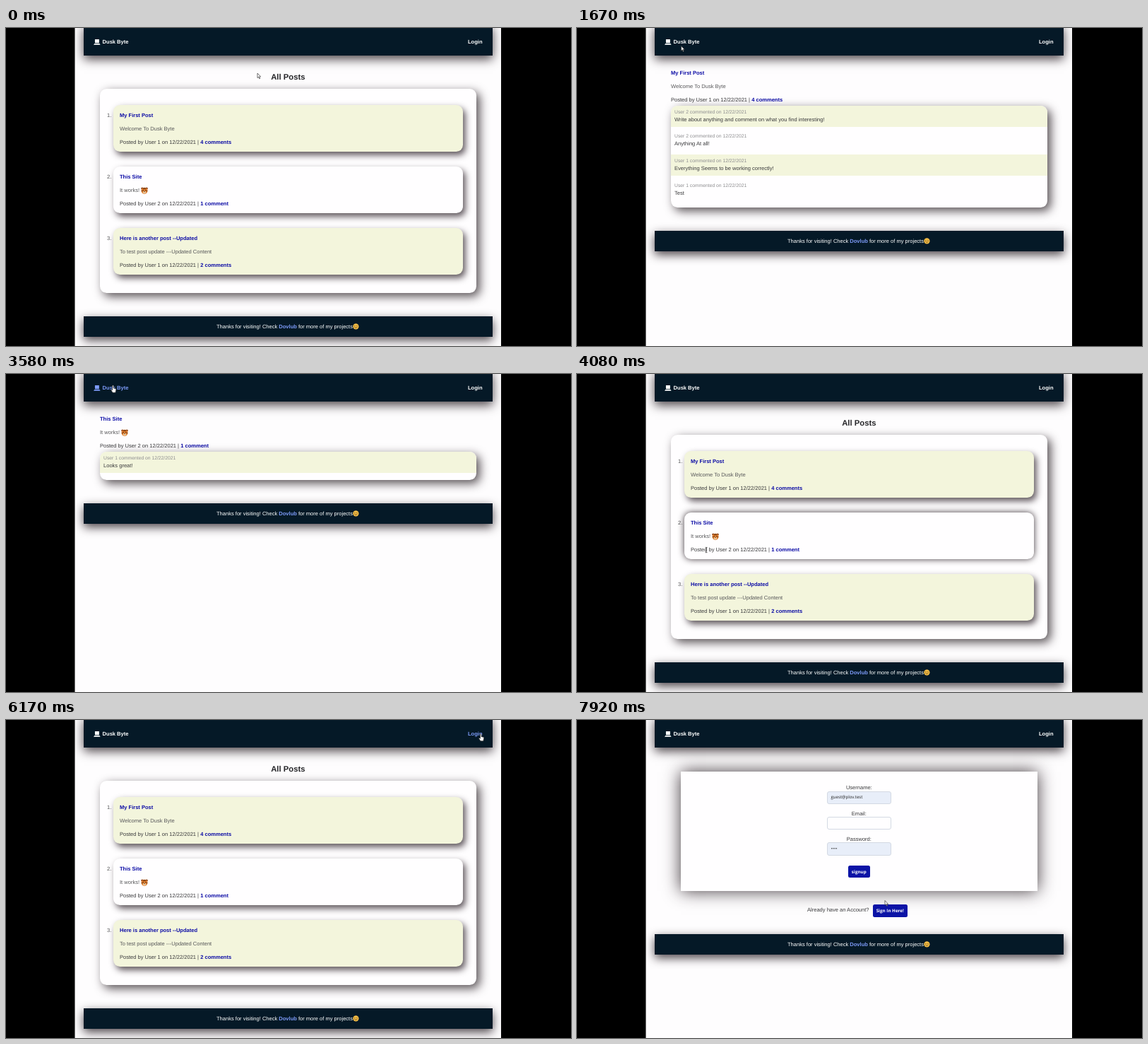
An HTML page for the animation above (8000 ms loop, 800x450 px).

```html
<!DOCTYPE html>
<html lang="en">
<head>
<meta charset="utf-8">
<title>Blog tour</title>
<style>
html, body { margin: 0; width: 100%; height: 100%; overflow: hidden; background: #000; }
#stage { position: absolute; inset: 0 auto auto 0; width: 800px; height: 450px; overflow: hidden;
  clip-path: inset(0 99px 0 97.5px); background: #fefdfe; color: #3a3a3c; cursor: none;
  font: 7.54px/10px "Liberation Sans", Arial, sans-serif; text-rendering: geometricPrecision; }
#stage div, #stage .t, #stage svg { position: absolute; box-sizing: border-box; }
#stage .page { position: static; display: none; }
#stage .page.show { display: block; }
.t { white-space: pre; }
.mid { transform: translateX(-50%); }
a { color: #0d0da6; font-weight: bold; }
a.on { color: #718af0; }
h1 { margin: 0; font-size: 11.3px; color: #27272a; }
.bar { background: #051927; box-shadow: 0 4.7px 14px rgba(30, 20, 26, .8); }
.bar ~ .t, .bar ~ .t a { color: #fff; }
.bar ~ .t a.on, .bar ~ .t .more { color: #7d9bf8; }
.panel { background: #fffeff; border-radius: 9.4px; box-shadow: 4.7px 4.7px 14px rgba(30, 20, 26, .75); }
.card { background: #fffeff; border-radius: 9.4px; box-shadow: 3.5px 4.7px 9.4px rgba(30, 20, 26, .72); }
.beige { background: #f3f5dc; }
.first { border-radius: 9.4px 9.4px 0 0; }
.item.on .card { box-shadow: 0 0 9.4px rgba(30, 20, 26, .85); }
.soft { color: #58585a; }
.note { font-size: 6.78px; color: #8d8d8f; }
.form { background: #fffeff; box-shadow: 0 0 23px rgba(30, 20, 26, .85); }
.field { border: 1px solid #d3d9e3; border-radius: 3px; background: #fffeff; }
.filled { background: #e8eef9; }
.small { font-family: "Open Sans", "Noto Sans", sans-serif; font-size: 6.1px; color: #222; }
#stage .btn { position: absolute; background: #0b13a6; color: #fff; border-radius: 2.5px; text-align: center;
  font: bold 6.28px/17px "Open Sans", "Noto Sans", sans-serif; }
#cursor { left: 0; top: 0; width: 14px; height: 16px; overflow: visible; pointer-events: none;
  fill: #fff; stroke: #333; stroke-width: .7; stroke-linejoin: round; }
</style>
</head>
<body>
<div id="stage"></div>
<script>
const SITE = 'Dusk Byte', DAY = '12/22/2021';

const box = (x, y, w, h, cls, tag = 'div', inner = '') =>
  `<${tag} class="${cls}" style="left:${x}px;top:${y}px;width:${w}px;height:${h}px">${inner}</${tag}>`;
const text = (x, y, s, cls = '', tag = 'span') =>
  `<${tag} class="t ${cls}" style="left:${x}px;top:${y - 5}px">${s}</${tag}>`;
const icon = (x, y, size, inner) =>
  `<svg style="left:${x}px;top:${y}px" width="${size}" height="${size}" viewBox="0 0 10 10">${inner}</svg>`;
const link = s => `<a>${s}</a>`;

const smile = `<circle cx="5" cy="5" r="4.7" fill="#f4bd45"/>
  <path d="M2.5 4.2q.8-1.1 1.6 0M5.9 4.2q.8-1.1 1.6 0M2.6 5.9q2.4 3 4.8 0" fill="none" stroke="#5a3a12" stroke-width=".9"/>`;
const tiger = `<circle cx="1.8" cy="2" r="1.6" fill="#8a3f16"/><circle cx="8.2" cy="2" r="1.6" fill="#8a3f16"/>
  <circle cx="5" cy="5.2" r="4.5" fill="#dd7a2b"/><ellipse cx="5" cy="7.4" rx="2.2" ry="1.6" fill="#f2d3a8"/>
  <path d="M5 1v2M3.3 1.5l.5 1.3M6.7 1.5l-.5 1.3M1 5.5h1.3M9 5.5H7.7M3 4.6h1M6 4.6h1M4.3 6.7h1.4" stroke="#40200f" stroke-width="1"/>`;
const thumb = `<path d="M.6 5h2l2-2.3.5-2.2q1.7 0 1.4 2L6.2 4h2.5q1 .6.4 1.5.5.8-.2 1.4.2.9-.5 1.3 0 1-.9 1H3.4L.6 8.8z"
  fill="#f0b93c" stroke="#4a3517" stroke-width=".8"/>`;
const laptop = `<path d="M2 1h6.2v5.6H2zM1.3 7.2h7.5L10 9H0z" fill="currentColor"/>`;

const posts = [
  { title: 'My First Post', body: 'Welcome To ' + SITE, user: 1, notes: [
    [2, 'Write about anything and comment on what you find interesting!'], [2, 'Anything At all!'],
    [1, 'Everything Seems to be working correctly!'], [1, 'Test']] },
  { title: 'This Site', body: 'It works!', tiger: true, user: 2, notes: [[1, 'Looks great!']] },
  { title: 'Here is another post --Updated', body: 'To test post update ---Updated Content', user: 1,
    notes: [[2, 'Perfect'], [1, '', thumb]] }
];

const footer = y => `<section>${box(110, y, 579, 29, 'bar')}` +
  text(298, y + 14.5, 'Thanks for visiting! Check <a class="more">Dovlub</a> for more of my projects') +
  icon(491.3, y + 10.3, 8.8, smile) + '</section>';

function summary(p, x, y) {
  const n = p.notes.length;
  return text(x, y, link(p.title)) + text(x, y + 19, p.body, 'soft') +
    (p.tiger ? icon(x + 30, y + 14, 10, tiger) : '') +
    text(x, y + 38, `Posted by User ${p.user} on ${DAY} | ` + link(n + (n > 1 ? ' comments' : ' comment')));
}

const home = text(399.3, 69.8, 'All Posts', 'mid', 'h1') + box(133, 86, 533, 289, 'panel') +
  posts.map((p, i) => {
    const y = 109.3 + 87 * i;
    return text(143, y + 15, i + 1 + '.', 'soft') + '<section class="item">' +
      box(152, y, 495, 66, i % 2 ? 'card' : 'card beige') + summary(p, 161, y + 15) + '</section>';
  }).join('') + footer(408);

function postPage(p) {
  const end = 115.3 + 34.7 * p.notes.length;
  return summary(p, 133, 64) + box(133, 110, 533, end - 110, 'panel') +
    p.notes.map(([user, words, pic], i) => {
      const y = 110 + 34.7 * i;
      return (i % 2 ? '' : box(133, y, 533, 30, i ? 'beige' : 'beige first')) +
        text(138, y + 9.5, `User ${user} commented on ${DAY}`, 'note') +
        text(138, y + 19.6, words) + (pic ? icon(138, y + 17.5, 9, pic) : '');
    }).join('') + footer(end + 33);
}

function formPage(fields, action, x, question, bx, button) {
  const end = 132.5 + 36.5 * fields.length;
  return box(147, 73, 505, end - 73, 'form') +
    fields.map(([name, value], i) => {
      const y = 96.3 + 36.4 * i;
      return text(399.3, y, name + ':', 'mid') + box(354, y + 4.2, 91, 18.3, value ? 'field filled' : 'field') +
        text(359.5, y + 13, value, 'small');
    }).join('') +
    box(384, end - 36, 30.5, 17, 'btn', 'a', action) + text(x, end + 27.3, question) +
    box(bx, end + 19, 49.5, 17.5, 'btn', 'a', button) + footer(end + 61);
}

const name = ['Username', 'guest@plov.test'], pass = ['Password', '••••'];
const pages = [home, ...posts.map(postPage),
  formPage([name, pass], 'login', 338, 'Need an Account?', 406, 'Sign Up Here!'),
  formPage([name, ['Email', ''], pass], 'signup', 326, 'Already have an Account?', 418.5, 'Sign In Here!')];

const stage = document.getElementById('stage');
stage.innerHTML = `<section>${box(110, -5, 579, 44, 'bar')}` +
  text(136.6, 20, `<a>${icon(-12.6, .2, 9.6, laptop)}${SITE}</a>`) + text(654, 20, link('Login')) + '</section>' +
  pages.map(p => `<div class="page">${p}</div>`).join('') + '<svg id="cursor"><path/></svg>';

const shapes = {
  arrow: 'M0 0V6.6L1.6 5.2 2.7 7.8 3.7 7.4 2.6 4.9H4.6Z',
  hand: 'M-.8.5Q0-.7.8.5V4L3.8 4.8Q4.6 5 4.4 6.2L3.6 10.3H-.4L-2.6 6.8Q-2.6 5.6-1.6 6L-.8 6.8Z',
  beam: 'M-1.5-3.6H1.5M0-3.6V3.6M-1.5 3.6H1.5'
};

// [start ms, page index]
const visits = [[0, 0], [1000, 1], [2080, 0], [2830, 2], [3670, 0], [4580, 3], [5500, 0], [6330, 4], [7420, 5]];
// [ms, x, y] of the pointer tip
const path = [[0, 356, 64], [580, 185, 126], [1080, 185, 126], [1670, 147.6, 25.6], [1830, 156, 21],
  [2080, 156, 21], [2670, 174, 212.5], [2920, 174, 212.5], [3420, 150, 16], [3670, 152, 16],
  [4080, 183, 249], [4420, 190, 298], [4670, 190, 298], [5330, 156, 21.3], [5500, 156, 21.3],
  [6170, 672.3, 19.5], [6420, 672.3, 19.5], [7170, 437, 235], [7600, 437, 235], [7920, 436, 255.5], [8000, 436, 255.5]];

const sheets = [...stage.querySelectorAll('.page')];
const cursor = document.getElementById('cursor');
const LOOP = 8000, FPS = 12;

function pointer(t) {
  const i = path.findIndex(k => k[0] > t), [t0, x0, y0] = path[i - 1], [t1, x1, y1] = path[i];
  const u = (t - t0) / (t1 - t0), e = u * u * (3 - 2 * u);
  return [x0 + (x1 - x0) * e, y0 + (y1 - y0) * e];
}

function draw(now) {
  const t = Math.floor((now % LOOP) * FPS / 1000 + .05) * 1000 / FPS % LOOP;
  const current = visits.findLast(v => v[0] <= t + 5)[1];
  sheets.forEach((s, i) => s.classList.toggle('show', i === current));

  const [x, y] = pointer(t), hit = document.elementFromPoint(x, y);
  stage.querySelectorAll('.on').forEach(e => e.classList.remove('on'));
  const over = hit?.closest('a');
  over?.classList.add('on');
  hit?.closest('.item')?.classList.add('on');
  const shape = over ? 'hand' : hit?.closest('.t') ? 'beam' : 'arrow';
  cursor.firstChild.setAttribute('d', shapes[shape]);
  cursor.style.transform = `translate(${x}px, ${y}px)`;
  requestAnimationFrame(draw);
}
requestAnimationFrame(draw);
</script>
</body>
</html>
```
